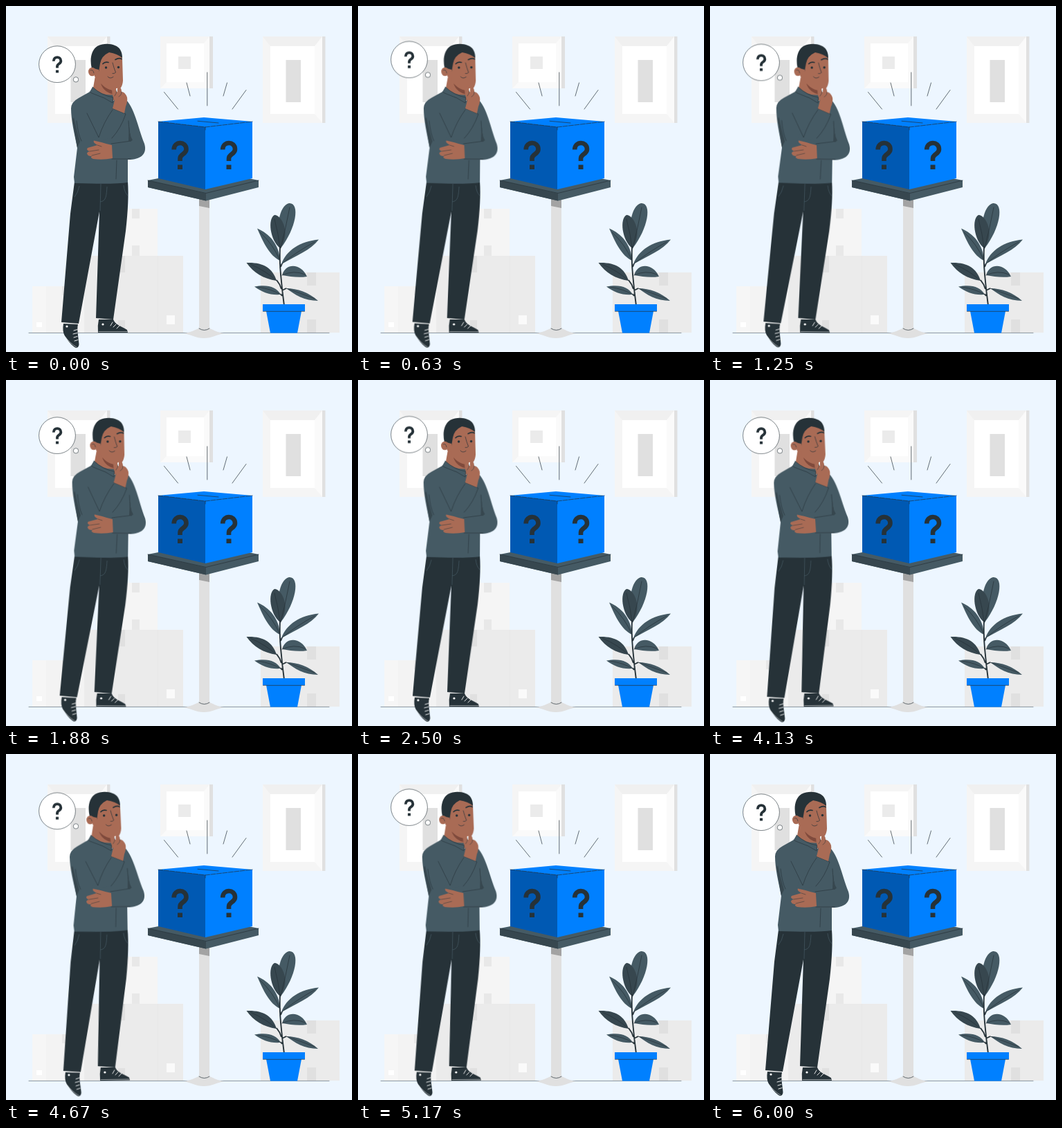
These frames come from a looping animation (500 px wide and 500 px high, 6040 ms). An HTML page:

```html
<!DOCTYPE html>
<html lang="en">
<head>
<meta charset="utf-8">
<title>Mystery box</title>
<style>
html, body { margin: 0; width: 100%; height: 100%; overflow: hidden; background: #edf6ff; }
svg { display: block; width: 100vw; height: 100vh; }
.line { fill: none; stroke: #263238; stroke-width: .7; stroke-linecap: round; stroke-linejoin: round; }
.light { fill: none; stroke: #fff; stroke-width: .9; stroke-linecap: round; }
.blue { fill: #0080ff; }
.dark { fill: #263238; }
.slate { fill: #455a64; }
.skin { fill: #a96b55; }
.man { transform-origin: 141px 274px; animation: sway 6.04s linear infinite; }
.bubble { animation: bob 6.04s linear infinite; }
/* One sway and four bobs in 6 s, then a 40 ms rest */
@keyframes sway {
  0%, 99.338%, 100% { transform: rotate(0deg); }
  24.834% { transform: rotate(1deg); }
  74.503% { transform: rotate(-1deg); }
}
@keyframes bob {
  0%, 24.834%, 49.669%, 74.503%, 99.338%, 100% { transform: translateY(0); }
  12.417%, 37.252%, 62.086%, 86.921% { transform: translateY(-8px); }
}
</style>
</head>
<body>
<svg viewBox="0 0 500 500" xmlns="http://www.w3.org/2000/svg">
<defs>
  <g id="query">
    <path d="M-8.8 12.5C-8.8 0 9 0 9 12C9 19.5 0 18.5 0 25.500V29" fill="none" stroke="#263238" stroke-width="6.6"/>
    <path class="dark" d="M-3.500 34.500h7v6.500h-7z"/>
  </g>
  <g id="tall">
    <path fill="#e0e0e0" d="M457 44h4.500v125H457z"/>
    <path fill="#f5f5f5" d="M371 44h86v125h-86z"/>
    <path fill="#f0f0f0" d="M371 44h86l-11 14h-64z"/>
    <path fill="#fafafa" d="M457 44v125l-11-13V58z"/>
    <path fill="#fff" d="M382 58h64v98h-64z"/>
    <path fill="#e0e0e0" d="M404.500 78H426v61h-21.500z"/>
  </g>
</defs>

<g id="wall">
  <use href="#tall"/>
  <use href="#tall" x="-311"/>
  <path fill="#e0e0e0" d="M294 44h5v75h-5z"/>
  <path fill="#f5f5f5" d="M223 44h71v75h-71z"/>
  <path fill="#fafafa" d="M294 44v75l-8-9V54zM223 119l9-9h54l8 9z"/>
  <path fill="#fff" d="M232 54h54v56h-54z"/>
  <path fill="#ebebeb" d="M249 73h18v18h-18z"/>
</g>

<g id="cartons">
  <path fill="#f5f5f5" d="M145 293h74v68h-74z"/>
  <path fill="#e8e8e8" d="M182 293h11v14h-11zM182 346h11v15h-11z"/>
  <path fill="#f3f3f3" d="M38 405h76v67H38z"/>
  <path fill="#f6f6f6" d="M38 405h20v67H38z"/>
  <path fill="#e8e8e8" d="M81 405h9v13h-9z"/>
  <path fill="#fff" d="M44 457h8v7h-8z"/>
  <path fill="#ebebeb" d="M113 361h143v111H113z"/>
  <path fill="#e8e8e8" d="M219 361h1v111h-1z"/>
  <path fill="#e0e0e0" d="M162 361h10v24h-10zM162 454h10v18h-10z"/>
  <path fill="#fafafa" d="M232 447h12v13h-12z"/>
  <path fill="#ebebeb" d="M368 385h114v87H368z"/>
  <path fill="#e0e0e0" d="M435 385h13v19h-13zM435 453h13v19h-13z"/>
</g>
<path class="line" d="M33 472.400H467" style="stroke-width:.5"/>

<g id="stand">
  <path fill="#e0e0e0" d="M257 473C268 472 274 467 280 465.500H293C299 467 304 472 315 473C304 475 298 480 286 480S268 475 257 473z"/>
  <path fill="#e0e0e0" d="M279 276h15v191q-7.500 4-15 0z"/>
  <path fill="#a3a3a3" d="M279 278h15v14l-15-3z"/>
  <path class="line" d="M279 466q7.500 5 15 0"/>
  <path class="slate" d="M205 252L286 236L365 252V262L289 281.500L205 262z"/>
  <path fill="#37474f" d="M205 252L289 271V281.500L205 262z"/>
  <path class="line" d="M205 252L289 270.500L365 252"/>
</g>

<g id="box">
  <path class="blue" d="M220 167L286 161L356 167V249L288 265z"/>
  <path fill="#0059b3" d="M220 167L288 175V265L220 249z"/>
  <path class="line" d="M220 167L288 175L356 167M288 175V179" stroke-dasharray="7 1.500"/>
  <path class="line" d="M277 166.300L307 169"/>
  <use href="#query" x="251.500" y="195"/>
  <use href="#query" x="322" y="195"/>
  <path class="line" d="M228.500 124.500L248.500 149M261 111L266 130M290.800 96V144M319.500 111L314 130M347 121.500L327 149"/>
</g>

<g id="plant">
  <path class="slate" d="M397 350C389 325 394 288 409 285C425 284 420 320 397 350z"/>
  <path fill="#37474f" d="M396 350C381 338 378 307 388 302C399 302 412 330 396 350z"/>
  <path class="slate" d="M396 368C381 361 372 342 363 321.500C381 329 395 345 396 368z
    M398 373C405 353 425 340 452 337.500C440 353 419 361 398 373z
    M399 389C404 370 427 372 435 391C422 393 411 391 399 389z
    M397 417C381 418 371 414 359 405.500C378 402 391 406 397 417z
    M405 408C421 408 438 414 451 426C431 426 417 417 405 408z"/>
  <path fill="#37474f" d="M391 397C372 394 358 386 347.500 371C371 370 385 378 391 397z"/>
  <path class="line" d="M410 291Q404 322 397 350M388 308Q394 330 396 350M367 327Q386 344 396 368M446 341Q420 355 398 373M353 373Q376 383 391 397M432 388Q416 381 399 389M364 406Q384 409 397 417M446 423Q423 414 405 408"/>
  <path d="M396 347Q395 365 397 388T402 433M397 377L399 372M397 416L399 419M399 411L405 408M391 396Q396 402 398 409" fill="none" stroke="#263238" stroke-width="1.900"/>
  <path class="blue" d="M371 431h61v10h-5l-6 31.500h-39L376 441h-5z"/>
  <path class="line" d="M371.500 441.300h60"/>
</g>

<g class="man">
  <g id="shoes">
    <path class="dark" d="M83 459L104 460C102 468 105 480 105.500 489Q105 494 101 494C95 491 90 484 85 477Q81 470 83 459z"/>
    <path class="dark" d="M134 453H155C158 461 169 464 175 468L176 472H133Q132 462 134 453z"/>
    <path class="light" d="M98 469l5-1.500M97 474l6-1.500M98 479l5-1.500M99 484l5-1.500M151 462l3-5M155 464l4-4M160 466l4-4"/>
    <path class="light" d="M84 476Q93 488 102 493M134 470.500H175" style="stroke-width:.5"/>
    <circle cx="88" cy="463" r="1.600" fill="#fff"/>
    <circle cx="140" cy="460" r="1.600" fill="#fff"/>
  </g>

  <g id="trousers">
    <path class="dark" d="M99 254H176Q178 281 173 325L155 453L130 451L135 297L105 459L80 457L93 300z"/>
    <path d="M137 257L136 296M146 261C145 274 145 282 136 283M106 260Q104 270 99 276M170 259Q171 269 176 274" fill="none" stroke="#455a64" stroke-width=".7"/>
  </g>

  <g id="head">
    <path class="skin" d="M130 95L162 112L157 137Q139 133 126 118z"/>
    <path fill="#7f4a3c" d="M137 112Q147 122 158 122L157 128Q141 125 137 112z"/>
    <path class="skin" d="M130 82Q132 62 151 61Q166 62 168 76L169 108Q168 122 157 122Q142 121 135 108z"/>
    <path class="dark" d="M127 99C120 84 121 65 132 58C144 52 160 55 165 63Q168 68 168 75Q161 69 149 67Q138 72 136 83L134 95z"/>
    <ellipse class="skin" cx="124.500" cy="95" rx="5.500" ry="6.300"/>
    <path class="skin" d="M126 90l8 2v12l-6-2z"/>
    <path class="line" d="M122 93Q126 91 127 97" style="stroke-width:.6"/>
    <path class="line" d="M140 83.500Q143 80 148 81.500M158 77.500Q163 74.500 167 76.500" style="stroke-width:1.700"/>
    <path class="line" d="M154 82Q156 90 158.500 96Q157 98 154 97.500M147 102Q150 106 155 102.500"/>
    <circle class="dark" cx="144.500" cy="89" r="1.700"/>
    <circle class="dark" cx="162.500" cy="88.500" r="1.700"/>
  </g>

  <g id="shirt">
    <path class="slate" d="M125 117Q139 131 156 137L158 131L171 133C186 146 190 174 200 199C204 212 197 221 180 222L176 222V255Q158 258 99 256L98 247L103 205C99 185 94 165 94 148Q94 139 105 133L121 124z"/>
    <path class="slate" d="M125 117Q140 131 156 128L154 140Q142 135 124 126z"/>
    <path class="slate" d="M154 148L173 156Q165 179 153 190L122 200Q134 171 154 148z"/>
    <path class="line" d="M125 117Q139 130 155 132L154 140L142 133L124 126L121 124M154 148L173 156Q166 177 153 191M154 150Q141 168 134 190L117 155M102 166Q104 185 109 195M177 166Q178 185 181 195L152 199M160 223L159 250M153 221H180" style="stroke-width:.6"/>
    <path fill="#37474f" d="M98 161Q102 180 107 196L103 205Q99 184 96 164zM178 164Q177 185 183 194L177 196z"/>
  </g>

  <g id="hands">
    <path class="skin" d="M154 148L157 136C153 130 152 119 155 117Q158 115 160 121Q161 115 164 117Q167 119 167 124Q172 124 175 132Q176 138 173 145L171 155z"/>
    <path fill="#fff" d="M159 119.500l2-1v6l-2-2z"/>
    <path class="line" d="M160 121Q160 127 157 130M167 124Q167 129 163 131" style="stroke-width:.5"/>
    <path class="skin" d="M153 201Q144 199 138 197L127 194.500Q125 197 132 201L118 205Q115 208 121 210Q115 212 118 215Q119 217 124 217Q121 219 126 221Q140 223 154 220z"/>
    <path class="line" d="M132 201L138 203M121 210L134 208M124 216L136 213" style="stroke-width:.5"/>
  </g>
</g>

<g class="bubble">
  <circle cx="74" cy="84.200" r="26.400" fill="#fff" stroke="#263238" stroke-width=".6"/>
  <circle cx="101" cy="106.300" r="3.700" fill="#fff" stroke="#263238" stroke-width=".6"/>
  <use href="#query" transform="translate(74 72.300) scale(.59)"/>
</g>
</svg>
</body>
</html>
```
